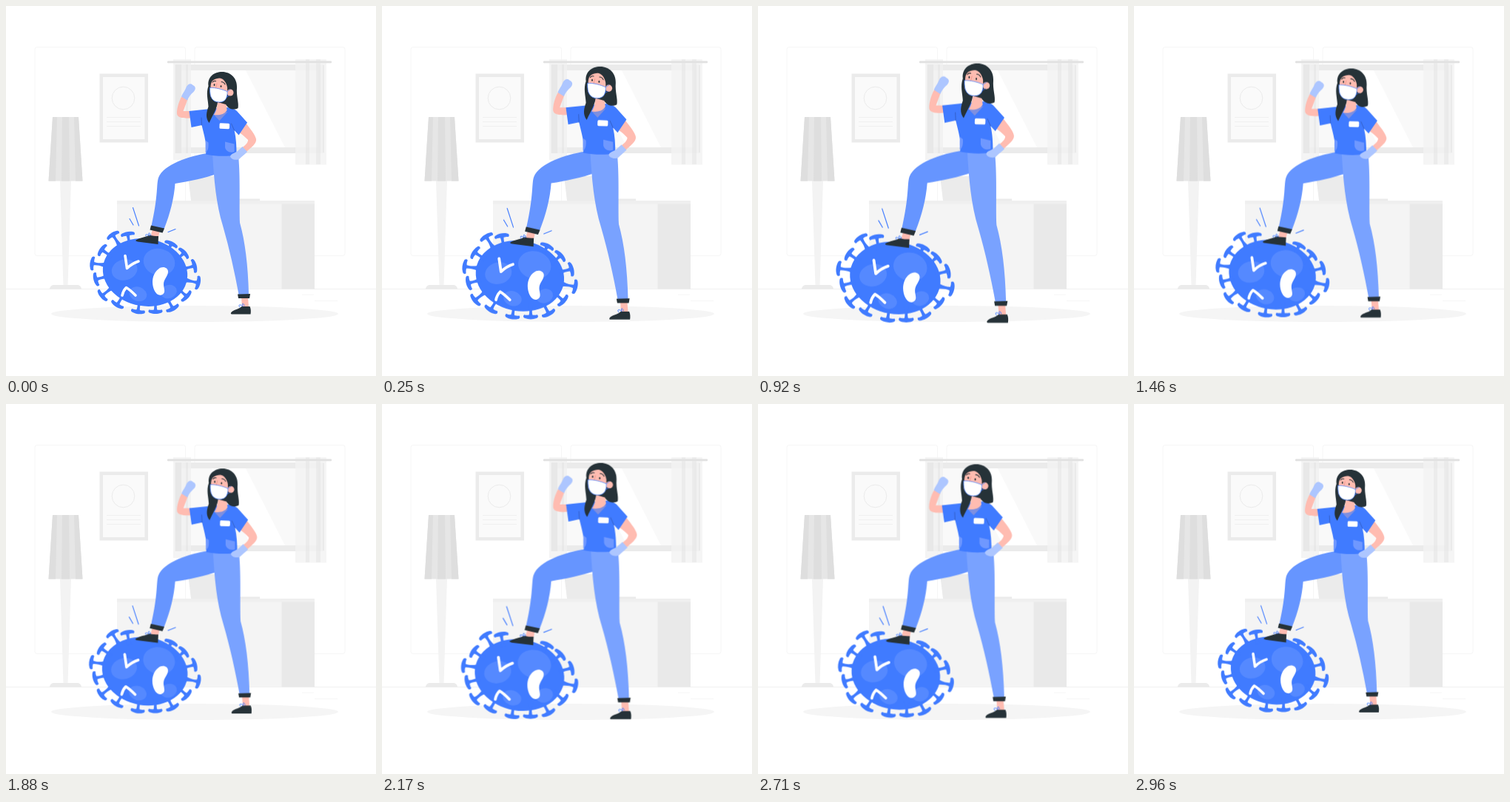
Recreate the animation shown at these times as an HTML page without scripts. Size 500x500 px, loop 3000 ms.

```html
<!DOCTYPE html>
<html lang="en">
<head>
<meta charset="utf-8">
<title>Nurse beats the virus</title>
<style>
html, body { margin: 0; width: 100%; height: 100%; overflow: hidden; background: #fff; }
svg { display: block; width: 100%; height: 100%; }
.line { fill: none; stroke-linecap: round; stroke-linejoin: round; }
.blue { fill: #407bff; }
.dark { fill: #263238; }
.skin { fill: #ffbcb1; }
.glove { fill: #adc6ff; }
.hero { transform-origin: 226px 252.5px; animation: pulse 3s linear infinite; }
@keyframes pulse {
  0%, 99%, 100% { transform: scale(1); }
  18.7%, 80.8% { transform: scale(1.098); }
  60.5% { transform: scale(1); }
}
</style>
</head>
<body>
<svg viewBox="0 0 500 500">
  <defs>
    <path id="spike" d="M-19-3.2C-13-1.5-9-1.4-5-2.2C-4.5-5-5-7-5.4-8.4C-3.6-10.4-1.5-9.6-.8-7.4C1-3 1 3-.8 7.4C-1.5 9.6-3.6 10.4-5.4 8.4C-5 7-4.5 5-5 2.2C-9 1.4-13 1.5-19 3.2Z"/>
  </defs>

  <!-- room -->
  <g fill="none" stroke="#f6f6f6">
    <rect x="39" y="55.5" width="203.500" height="282" rx="3"/>
    <rect x="255" y="55.500" width="203" height="282" rx="3"/>
    <path stroke="#ededed" stroke-width=".8" d="M0 382.500H500"/>
    <path d="M400 390H416M417 398.500H448"/>
  </g>

  <!-- window -->
  <path fill="#ebebeb" d="M228 79H430V199H228Z"/>
  <path fill="#f9f9f9" d="M237 87H421V191H237Z"/>
  <path fill="#fff" d="M278 87H324L377 191H331Z"/>
  <path fill="#f0f0f0" opacity=".75" d="M226 72H250V208H226Z"/>
  <path fill="#e4e4e4" opacity=".55" d="M229 79H237V199H229ZM243 79H246V199H243Z"/>
  <path fill="#f3f3f3" opacity=".8" d="M391 72H433V214.500H391Z"/>
  <path fill="#e6e6e6" opacity=".55" d="M405 72H410V214H405ZM419 72H425V214H419ZM428 80H430V198H428Z"/>
  <rect x="218" y="74.300" width="222" height="3" rx="1" fill="#e2e2e2"/>

  <!-- picture -->
  <path fill="#ebebeb" d="M126.500 91.500H192V184.500H126.500Z"/>
  <path fill="#fafafa" d="M131 96H187.500V180H131Z"/>
  <g fill="none" stroke="#ebebeb">
    <circle cx="158.500" cy="124.500" r="15.300"/>
    <path stroke="#f0f0f0" d="M136 150.500H182M136 156.500H182M136 162.500H182"/>
  </g>

  <!-- lamp -->
  <path fill="#f3f3f3" d="M73 236H88L83.500 378H77.500Z"/>
  <path fill="#ebebeb" d="M59 382.500C59 379 62 377 65 377H96C99 377 102 379 102 382.500Z"/>
  <path fill="#e6e6e6" d="M63 150H98L103.500 236.500H57.500Z"/>
  <path fill="#dedede" d="M63 150H69L67 236.500H57.500ZM76 150H85L86 236.500H75ZM92 150H98L103.500 236.500H94Z"/>

  <!-- desk -->
  <path fill="#ebebeb" d="M246 230H290V263H250Z"/>
  <path fill="#ebebeb" d="M290 260.500H343V263H290Z"/>
  <path fill="#f4f4f4" d="M150 263H417V382.500H150Z"/>
  <path fill="#e9e9e9" d="M372.500 263H417V382.500H372.500Z"/>
  <path fill="#efefef" d="M150 263H417V267.500H150Z"/>
  <ellipse cx="255" cy="416" rx="194" ry="11" fill="#f5f5f5"/>

  <g class="hero">
    <!-- virus -->
    <g class="blue">
      <ellipse cx="188" cy="360" rx="57.500" ry="45.500" transform="rotate(10 188 360)"/>
      <use href="#spike" transform="translate(143 307) rotate(-122)"/>
      <use href="#spike" transform="translate(164 305.500) rotate(-100)"/>
      <use href="#spike" transform="translate(127.500 328) rotate(-145)"/>
      <use href="#spike" transform="translate(114 347.500) rotate(187)"/>
      <use href="#spike" transform="translate(119 370) rotate(165)"/>
      <use href="#spike" transform="translate(128 393) rotate(141)"/>
      <use href="#spike" transform="translate(149 406) rotate(121)"/>
      <use href="#spike" transform="translate(178 415.500) rotate(98)"/>
      <use href="#spike" transform="translate(202 415.500) rotate(90)"/>
      <use href="#spike" transform="translate(226.500 411) rotate(62)"/>
      <use href="#spike" transform="translate(246 394) rotate(42)"/>
      <use href="#spike" transform="translate(262 374.500) rotate(12)"/>
      <use href="#spike" transform="translate(257 350.500) rotate(-15)"/>
      <use href="#spike" transform="translate(242.500 332) rotate(-42)"/>
      <use href="#spike" transform="translate(224.500 319) rotate(-64)"/>
    </g>
    <g fill="#fff" opacity=".11">
      <ellipse cx="207" cy="346" rx="21.500" ry="18" transform="rotate(15 207 346)"/>
      <ellipse cx="160" cy="356.500" rx="17.500" ry="14" transform="rotate(-15 160 356)"/>
      <ellipse cx="178.500" cy="389" rx="12" ry="9.500" transform="rotate(20 178 389)"/>
      <ellipse cx="220" cy="386" rx="11" ry="9" transform="rotate(-20 220 386)"/>
    </g>
    <path class="line" stroke="#fff" stroke-width="3.600" d="M161 337.500L163.500 354.500C168 350 173 347 179 345M157 391C158 386 160 383 162.500 380.500C167 383 171 387 175 391"/>
    <path fill="#fff" d="M206 355.500C211 351 219 353 219 359C219 365 213 369 213 376C213 382 217 388 210 390.500C203 392.500 198 382 198 373C198 366 201 359 206 355.500Z"/>
    <path class="line" stroke="#407bff" stroke-width="1.100" d="M171.500 272.500L179.500 297M167 287.500L172 296M219 305.500L229 301.500"/>

    <!-- legs -->
    <path class="skin" d="M198 302L207.500 305L205.500 314L195.500 311Z"/>
    <path class="dark" d="M175.500 316.500C181 313 189 312.500 194 309.500C198 311 202 311 206 311L205.500 322L178 318.500C176 318 175 317.500 175.500 316.500Z"/>
    <path class="line" stroke="#407bff" stroke-width=".9" d="M190 311.500C187 309 189 307 194 310.500C191 306 194 305 196 310"/>
    <path fill="#6695ff" d="M272 199C247 203 213 214 206 232C203 241 206 255 196.500 297L213.500 301.500C222 280 227 260 228.500 240C247 237 268 233 287 226V199Z"/>
    <path class="dark" d="M196 296.500L214 300.500L211.500 306.500L194.500 302.500Z"/>
    <path class="skin" d="M318 394H327L328 407H319Z"/>
    <path class="dark" d="M304 414.500C307 410 314 410.500 318.500 406H329.500C331 409 331 413 330.500 416.500H305C304 416.500 303.500 415.500 304 414.500Z"/>
    <path class="line" stroke="#407bff" stroke-width=".9" d="M316 407C313 404 316 402 320 406C318 401 321 401 322 405"/>
    <path fill="#79a2ff" d="M279 199H313.500C317 225 315 268 316 293C323 318 327 350 328 390H314.500C309 360 302 328 293 297C284 268 281 235 279 199Z"/>
    <path class="dark" d="M313 389.500L330 389L329 395H314Z"/>

    <!-- arms and scrubs -->
    <path class="skin" d="M250 142L239.500 142L245.500 126L237.500 122C233 130 230.500 140 231 146C232 151.500 240 152 251 151.500Z"/>
    <path class="glove" d="M237 122.500C238.500 118 241 116 243 111C245 105 250 104 252.500 107C257 109 256.500 113 253.500 116C249 120 247 123 245 127.500Z"/>
    <path class="skin" d="M324 158C330 166 337 174 338 180C339 186 330 192 325 197L319.500 191C325 187 327 184 327 181C323 177 320 174 315 171Z"/>
    <path class="blue" d="M247.500 142L281 138.500L299 137C304 137.500 309 139 312 142L326 157.500L314.500 174.500L308.500 168C311 178 311.500 190 311.500 201C298 204 283 203 270 200.500C272 188 268 176 264.500 161L250.500 164Z"/>
    <path class="line" stroke="#3058b8" stroke-width=".7" d="M264.500 161L264 151M308.500 168L304.500 159"/>
    <path fill="#6f98ff" d="M296 183.500L308.500 186.500V197C302 199 297 196 296 191ZM270 182L273.500 184.500C274 191 273 196 269.500 198C270 193 269 188 270 182Z"/>
    <rect x="288.500" y="158.500" width="13.500" height="7.500" rx="1.500" fill="#fff" transform="rotate(2 295 162)"/>
    <path class="glove" d="M319.500 190L326 197C322 201 319 203 315 207C309 209.500 303 206 303 203C304 199 312 198 314 195Z"/>

    <!-- head -->
    <path fill="#7e8fe0" d="M280 146L299.500 143L288.500 155Z"/>
    <path class="skin" d="M286 126H297L298.500 141C295 147 287 148 281 147C284 142 286 136 286 126Z"/>
    <path class="dark" d="M273.500 108C272 96 281 89 292 89C304 89 312.500 98 312 110C311 122 315 131 313.500 138C308 141 301 140 297 133L286 130C285 139 280 146 274.500 158C269 151 271 143 273.500 136C273 126 270 118 273.500 108Z"/>
    <path class="skin" d="M276.500 108C277 100 282 98 289 97.500C294 98 298 104 299 110V119C294 130 280 130 276 121Z"/>
    <circle class="skin" cx="303" cy="117" r="4.500"/>
    <ellipse class="dark" cx="281.500" cy="106.500" rx=".9" ry="1.500"/>
    <ellipse class="dark" cx="290.500" cy="108.500" rx=".9" ry="1.500"/>
    <path class="line" stroke="#263238" stroke-width="1" d="M279 103C280 101.500 282 101 283.500 101.500M291 102.500C293 102.500 295 104 296 106"/>
    <path class="line" stroke="#ee8f84" stroke-width=".7" d="M285 105L283.500 111"/>
    <path fill="#fff" stroke="#407bff" stroke-width=".7" d="M275.500 110.500C283 110 292 112.500 299 115.500C299.500 123 297 130 288 130C279 129.500 275 124 275.500 110.500Z"/>
    <path class="line" stroke="#407bff" stroke-width=".7" d="M299 115.500L303 113M298 123L302 121"/>
  </g>
</svg>
</body>
</html>
```
